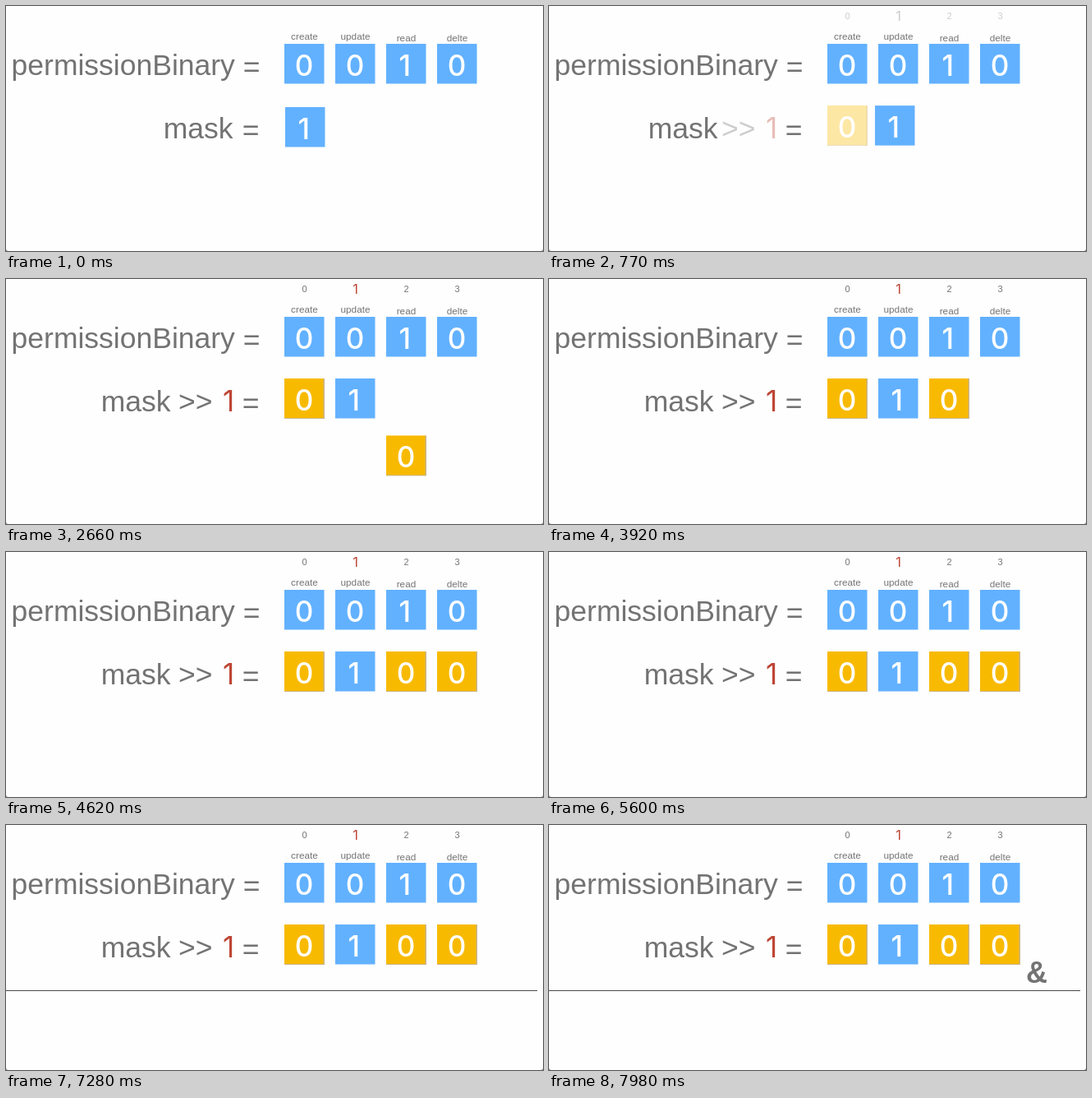
These frames come from a looping animation (654x298 px, 8000 ms). An HTML page with a canvas:

```html
<!DOCTYPE html>
<html lang="en">
<head>
<meta charset="utf-8">
<title>Bit mask</title>
<style>
  html, body { margin: 0; width: 100%; height: 100%; overflow: hidden; background: #fefefe; }
  canvas { display: block; }
</style>
</head>
<body>
<canvas></canvas>
<script>
const W = 654, H = 298, LOOP = 8000;
const GREY = '#737373', LABEL = '#747474', RED = [190, 70, 54], BLUE = '#62b1ff', ORANGE = '#f8ba00';
const SANS = '"Liberation Sans", Arial, sans-serif', DIGITS = 'Inter, sans-serif';
const COLUMNS = [339, 401, 463, 525], ROW1 = 46, ROW2 = 121;

const canvas = document.querySelector('canvas');
const ctx = canvas.getContext('2d');
const ratio = window.devicePixelRatio || 1;
canvas.width = W * ratio;
canvas.height = H * ratio;
canvas.style.width = W + 'px';
canvas.style.height = H + 'px';

const mix = (a, b, p) => a + (b - a) * p;
const linear = (t, start, end) => Math.min(1, Math.max(0, (t - start) / (end - start)));
const ease = (t, start, end) => (1 - Math.cos(Math.PI * linear(t, start, end))) / 2;

function text(str, x, y, font, color = GREY, align = 'left') {
  ctx.font = font;
  ctx.fillStyle = color;
  ctx.textAlign = align;
  ctx.fillText(str, x, y);
}

function faded(alpha, paint) {
  ctx.globalAlpha = alpha;
  paint();
  ctx.globalAlpha = 1;
}

function tile(digit, x, y, color, alpha = 1) {
  faded(alpha, () => {
    ctx.fillStyle = color;
    ctx.fillRect(x, y, 48.5, 48.5);
    if (color === ORANGE) {
      ctx.fillStyle = '#c9b48a';
      ctx.fillRect(x + 47.5, y, 1.5, 49);
      ctx.fillRect(x, y + 48, 48, 1);
    }
  });
  const center = digit === '1' ? x + 22.8 : x + 24;
  text(digit, center, y + 38.5, `500 35px ${DIGITS}`, '#fff', 'center');
}

function corners() {
  ctx.fillStyle = '#999';
  for (const [x, dir] of [[0, 1], [W, -1]]) {
    ctx.beginPath();
    ctx.moveTo(x, H - 2);
    ctx.lineTo(x, H);
    ctx.lineTo(x + 2 * dir, H);
    ctx.fill();
  }
}

function draw(t) {
  const shift = ease(t, 70, 910);
  const fade = linear(t, 560, 1160);
  const big = `35.5px ${SANS}`;

  ctx.setTransform(ratio, 0, 0, ratio, 0, 0);
  ctx.fillStyle = '#fefefe';
  ctx.fillRect(0, 0, W, H);
  corners();

  // Permission row with labels and indices
  text('permissionBinary', 6.6, 84, big);
  text('=', 288.7, 86, big);
  ['create', 'update', 'read', 'delte'].forEach((label, i) => {
    const center = COLUMNS[i] + 24.5;
    text(label, center, i < 2 ? 41 : 43, `11.8px ${SANS}`, LABEL, 'center');
    tile('0010'[i], COLUMNS[i], ROW1, BLUE);
    faded(fade, () => {
      if (i === 1) {
        const tint = linear(t, 770, 1300);
        const rgb = RED.map(c => Math.round(mix(110, c, tint)));
        text('1', center, 18, `16.5px ${DIGITS}`, `rgb(${rgb})`, 'center');
      } else {
        text(i, center, 16, `11px ${SANS}`, LABEL, 'center');
      }
    });
  });

  // Mask row: the set bit slides right while its padding appears
  text('mask', mix(191.7, 115.7, shift), 161, big);
  text('=', 287.7, 163, big);
  faded(fade, () => {
    text('>>', 210, 161, big);
    text('1', 271, 161, `35px ${DIGITS}`, `rgb(${RED})`, 'center');
  });
  tile('0', COLUMNS[0], ROW2, ORANGE, fade);
  tile('1', mix(340, COLUMNS[1], shift), mix(123, ROW2, shift), BLUE);
  [2375, 3925].forEach((start, i) => {
    const rise = ease(t, start, start + 500);
    tile('0', COLUMNS[i + 2], mix(300, ROW2, rise), ORANGE);
  });

  // Sum line and operator
  ctx.fillStyle = '#484848';
  ctx.fillRect(0, 201, 647 * ease(t, 5950, 6700), 1);
  text('&', mix(660, 581, ease(t, 7480, 7940)), 192, `bold 36px ${SANS}`);
}

function frame(now) {
  draw(now % LOOP);
  requestAnimationFrame(frame);
}
requestAnimationFrame(frame);
</script>
</body>
</html>
```
